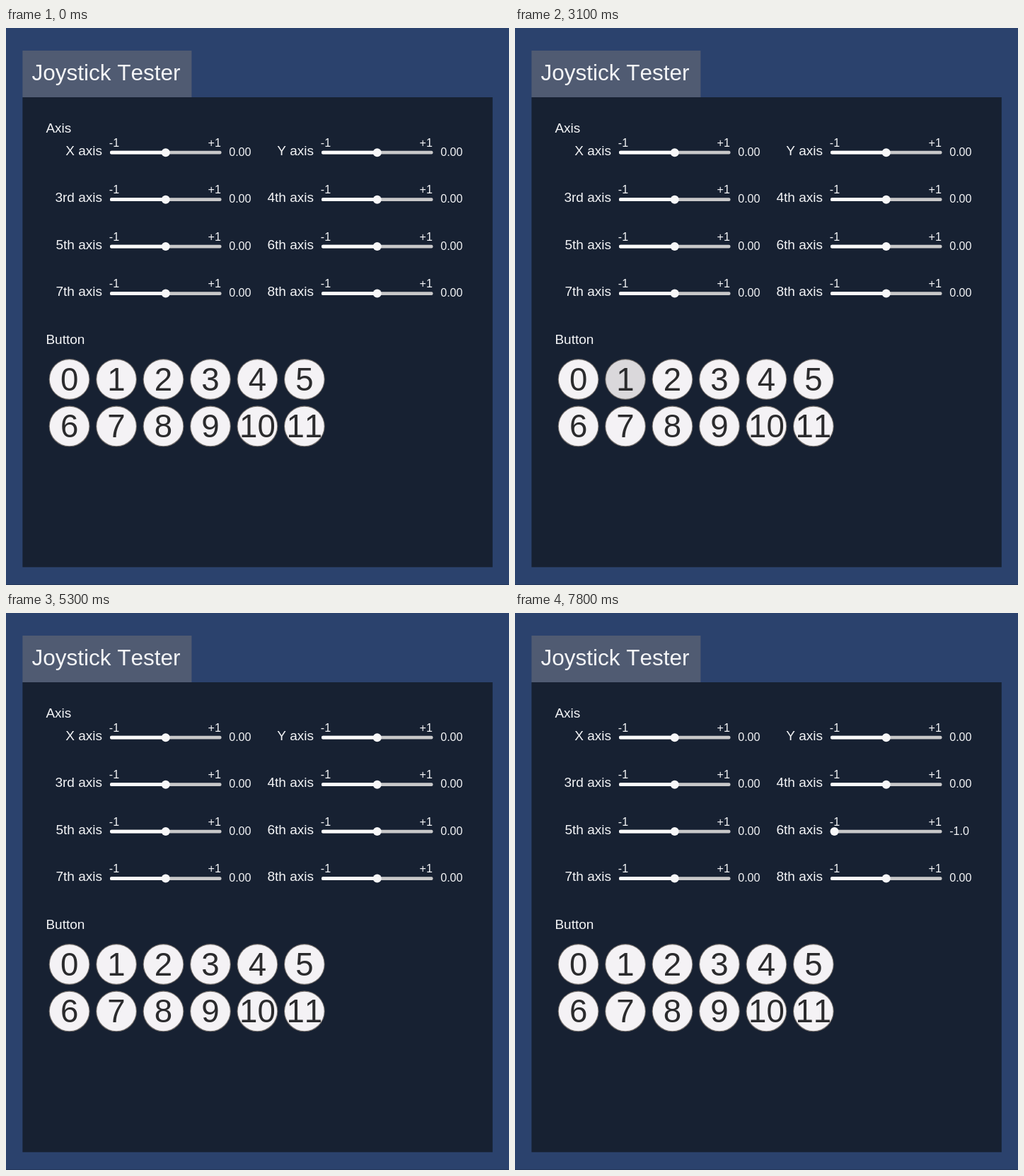
Recreate the animation shown at these times as an HTML page with a canvas. Size 711x788 px, loop 8000 ms.

```html
<!DOCTYPE html>
<html lang="en">
<head>
<meta charset="utf-8">
<title>Joystick Tester</title>
<style>
  html, body { margin: 0; width: 100%; height: 100%; overflow: hidden; background: #2b426d; }
  canvas { display: block; }
</style>
</head>
<body>
<canvas id="stage" width="711" height="788"></canvas>
<script>
const ctx = document.getElementById('stage').getContext('2d');
const LOOP = 8000, STEP = 100;
const CELL = 66.45, COLUMN = 299;
const SMALL = 16.1, LABEL = 19, TITLE = 31.5, DIGIT = 45.6;
const FADE_IN = 200, FADE_OUT = 100;
const AXES = ['X', 'Y', '3rd', '4th', '5th', '6th', '7th', '8th'];

const presses = [
  { button: 0, down: 500, up: 1050 },
  { button: 3, down: 1800, up: 2200 },
  { button: 1, down: 3000, up: 3450 },
  { button: 2, down: 3900, up: 4350 },
  { button: 5, down: 5700, up: 6100 },
  { button: 4, down: 6500, up: 6800 },
  { button: 7, down: 7100, up: 7650 }
];
const pull = { axis: 5, from: 7100, to: 7800 };

const clamp = v => Math.min(1, Math.max(0, v));

function pressLevel(button, t) {
  const p = presses.find(p => p.button === button);
  return p ? clamp(Math.min((t - p.down) / FADE_IN, (p.up - t) / FADE_OUT)) : 0;
}

// The trigger reads 0 until first touched, then swings from -1 to +1 and back.
function axisValue(axis, t) {
  if (axis !== pull.axis || t <= pull.from) return 0;
  return -Math.cos(2 * Math.PI * clamp((t - pull.from) / (pull.to - pull.from)));
}

function rect(x, y, w, h, color, radius = 0) {
  ctx.fillStyle = color;
  ctx.beginPath();
  ctx.roundRect(x, y, w, h, radius);
  ctx.fill();
}

function disc(x, y, r, color) {
  ctx.fillStyle = color;
  ctx.beginPath();
  ctx.arc(x, y, r, 0, Math.PI * 2);
  ctx.fill();
}

function text(str, x, y, size, align = 'left', color = '#f4f5f7') {
  ctx.font = `${size}px "Liberation Sans", Arial, sans-serif`;
  ctx.fontKerning = 'none';
  ctx.textAlign = align;
  ctx.fillStyle = color;
  ctx.fillText(str, x, y);
}

function drawAxis(i, value) {
  const x = 147 + (i % 2) * COLUMN;
  const y = 176.2 + Math.floor(i / 2) * CELL;
  const knob = x + 78.7 + value * 73.2;
  text(AXES[i] + ' axis', x - 11, y + 3.5, LABEL, 'right');
  text('-1', x - 1.2, y - 8.2, SMALL);
  text('+1', x + 138.5, y - 8.2, SMALL);
  rect(x, y - 2.35, 157.5, 4.7, '#c8c8c9', 2);
  rect(x, y - 2.35, knob - x, 4.7, '#fafafa', 2);
  disc(knob, y, 6, '#f7f7f8');
  text(value.toFixed(2).slice(0, 4), x + 168.2, y + 4.8, SMALL);
}

function drawButton(i, level) {
  const x = 89.6 + (i % 6) * CELL;
  const y = 497 + Math.floor(i / 6) * CELL;
  const tint = c => Math.round(c * (1 - level * .216));
  const shade = (r, g, b) => `rgb(${tint(r)},${tint(g)},${tint(b)})`;
  disc(x, y, 28.9, shade(116, 111, 108));
  disc(x, y, 27.8, shade(244, 242, 245));
  text(i, x, y + DIGIT * .347, DIGIT, 'center', '#2b2b2d');
}

function draw(t) {
  rect(0, 0, 711, 788, '#2b426d');
  rect(0, 787, 711, 1, '#24375b');
  rect(23.4, 98, 664.4, 664.7, '#172132');
  rect(23.4, 32, 239, 66, '#505b72');
  text('Joystick Tester', 36.5, 74, TITLE);
  text('Axis', 56.4, 148, LABEL);
  text('Button', 56.4, 447, LABEL);
  AXES.forEach((_, i) => drawAxis(i, axisValue(i, t)));
  for (let i = 0; i < 12; i++) drawButton(i, pressLevel(i, t));
}

const start = performance.now();
function frame() {
  const t = (performance.now() - start) % LOOP;
  draw(Math.floor(t / STEP) * STEP);
  requestAnimationFrame(frame);
}
frame();
</script>
</body>
</html>
```
